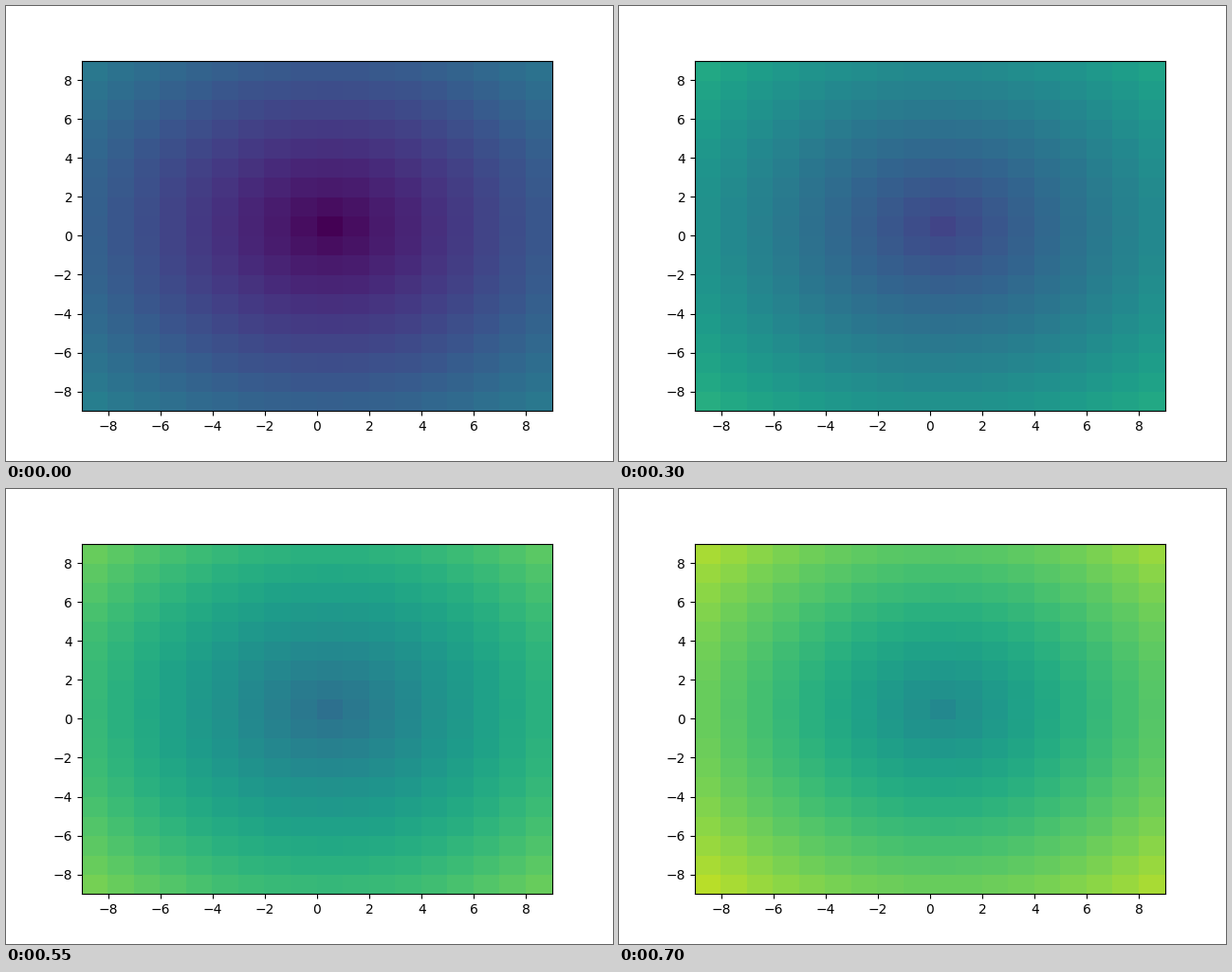
Write a matplotlib script that moves like this. It is 640 by 480 pixels and loops after 0.75 s.

```python
import numpy as np
import matplotlib.pyplot as plt
from matplotlib.animation import ArtistAnimation

STEPS = 15
INTERVAL = 50

fig, ax = plt.subplots(figsize=(6.4, 4.8), dpi=100)

# Cell edges; each cell takes the distance of its lower left corner.
edges = np.arange(-9, 10)
base = np.hypot(edges[:-1], edges[:-1, None])
norm = plt.Normalize(0, 30)

frames = [
    [ax.pcolor(edges, edges, base + step, norm=norm, cmap="viridis")]
    for step in range(STEPS)
]
ax.set(xlim=(-9, 9), ylim=(-9, 9))

anim = ArtistAnimation(fig, frames, interval=INTERVAL, repeat=True,
                       repeat_delay=0, blit=False)
plt.show()
```
